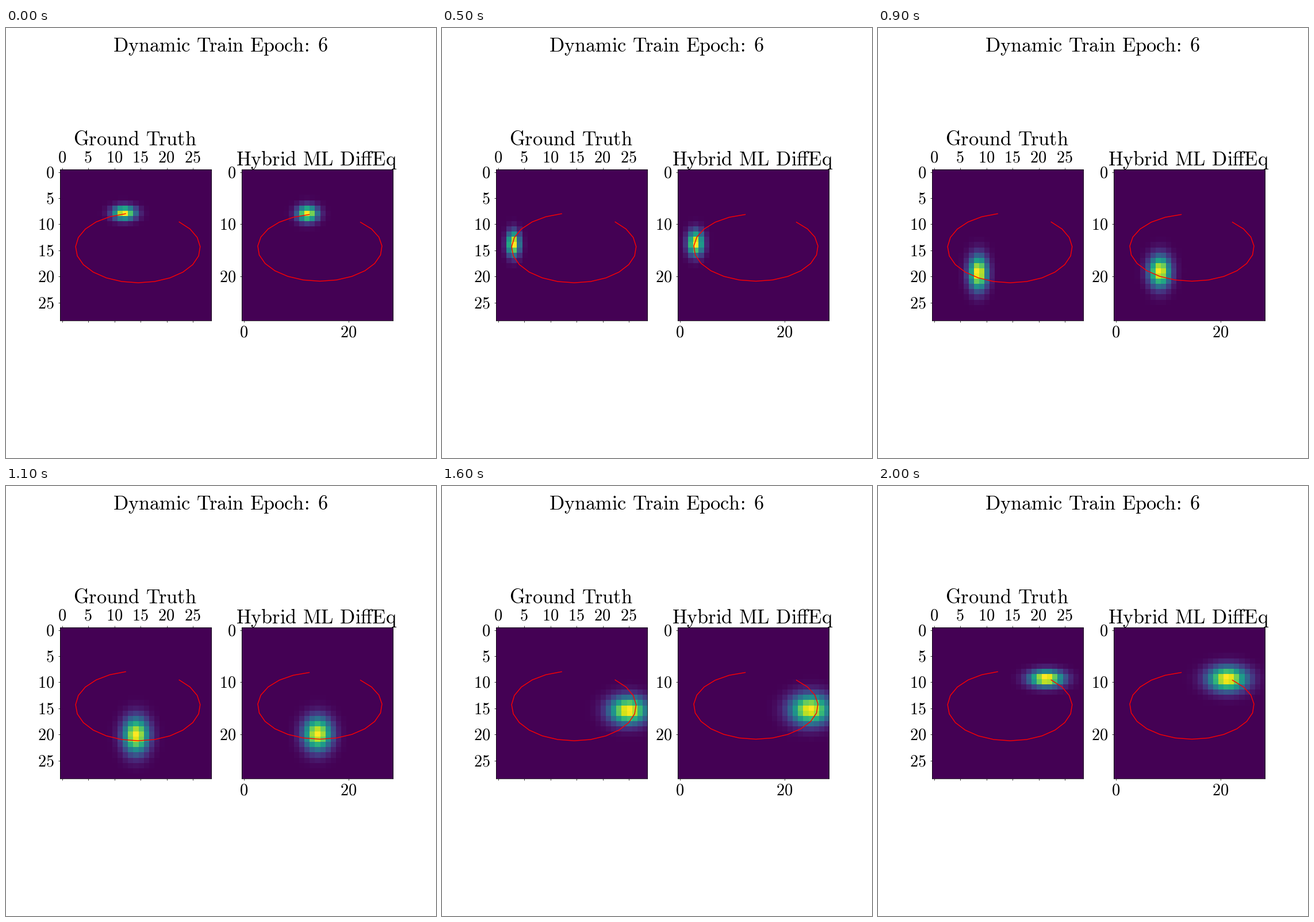
Write a matplotlib script that moves like this. It is 748 px wide and 748 px high and loops after 2.1 s.

```python
import numpy as np
import matplotlib.pyplot as plt
from matplotlib.animation import FuncAnimation

plt.rcParams["mathtext.fontset"] = "cm"

INCHES, DPI = 11, 68
SIZE = INCHES * DPI
GRID, STEPS = 29, 21
SIDE = 0.775 * SIZE / 2.2          # panel side in pixels
TOP = 0.505 * SIZE - SIDE / 2
CELL = SIDE / GRID
LEFT, RIGHT = 0.125 * SIZE, 0.9 * SIZE - SIDE
TITLE, LABEL = 36.4, 30

fig = plt.figure(figsize=(INCHES, INCHES), dpi=DPI, facecolor="white")


def put(x, y, text, size, ha="center"):
    """Text with its baseline at pixel (x, y), measured from the top left."""
    # TeX spacing: kern the pair "Tr", widen the space after a colon
    text = str(text).replace("Tr", r"T}\hspace{-0.095}\text{r")
    text = text.replace(": ", r": }\hspace{0.126}\text{")
    fig.text(x / SIZE, 1 - y / SIZE, rf"$\text{{{text}}}$", fontsize=size,
             ha=ha, va="baseline")


def true_orbit(t):
    return (14.46 - 11.93 * np.cos(0.268 * (t - 5.12)),
            14.53 + 6.67 * np.cos(0.268 * (t - 11)))


def model_orbit(t):
    return (14.5 - 11.9 * np.cos(0.27 * (t - 5.18)),
            14.47 + 6.43 * np.cos(0.27 * (t - 11)))


def true_spread(x, y, t):
    return 0.6 + 0.075 * x, 0.113 * y


def model_spread(x, y, t):
    return 0.65 + 0.055 * x + 0.035 * t, 0.45 + 0.072 * y + 0.023 * t


def density(orbit, spread, t):
    """Gaussian blob that follows the orbit, drawn a little towards the centre."""
    cx, cy = (14 + (v - 14.5) * 28 / 30 for v in orbit(t))
    sx, sy = spread(cx, cy, t)
    n = np.arange(GRID)
    z = np.outer(np.exp(-((n - cy) / sy) ** 2 / 2),
                 np.exp(-((n - cx) / sx) ** 2 / 2))
    return z / z.max()


def panel(left, orbit, spread, xticks, yticks, label_y, top):
    ax = fig.add_axes([left / SIZE, 1 - (TOP + SIDE) / SIZE,
                       SIDE / SIZE, SIDE / SIZE])
    image = ax.imshow(density(orbit, spread, 0), cmap="viridis",
                      vmin=0, vmax=1, interpolation="nearest")
    ax.plot(*orbit(np.arange(STEPS)), color="red", lw=1.5)
    ax.set(xlim=(-.5, GRID - .5), ylim=(GRID - .5, -.5),
           xticks=xticks, yticks=yticks)
    ax.tick_params(top=top, labelbottom=False, labelleft=False)
    for v in xticks:
        put(left + (v + .5) * CELL - .7, label_y, v, LABEL)
    for v in yticks:
        put(left - 9.7, TOP + (v + .5) * CELL + 9.6, v, LABEL, "right")
    return image, orbit, spread


fives = range(0, 26, 5)
panels = [
    panel(LEFT, true_orbit, true_spread, fives, fives, 233, True),
    panel(RIGHT, model_orbit, model_spread,
          range(0, 21, 20), range(0, 21, 10), 538, False)]

put(SIZE / 2 - 1, 40.5, "Dynamic Train Epoch: 6", TITLE)
put(LEFT + SIDE / 2 - 1, 204, "Ground Truth", TITLE)
# \u00ae is the ff ligature slot of the Computer Modern font
put(RIGHT + SIDE / 2 - 1, 238.5, "Hybrid ML Di\u00aeEq", TITLE)


def update(step):
    for image, orbit, spread in panels:
        image.set_data(density(orbit, spread, step))
    return [p[0] for p in panels]


anim = FuncAnimation(fig, update, frames=STEPS, interval=100, repeat=True,
                     repeat_delay=0, blit=False)
plt.show()
```
